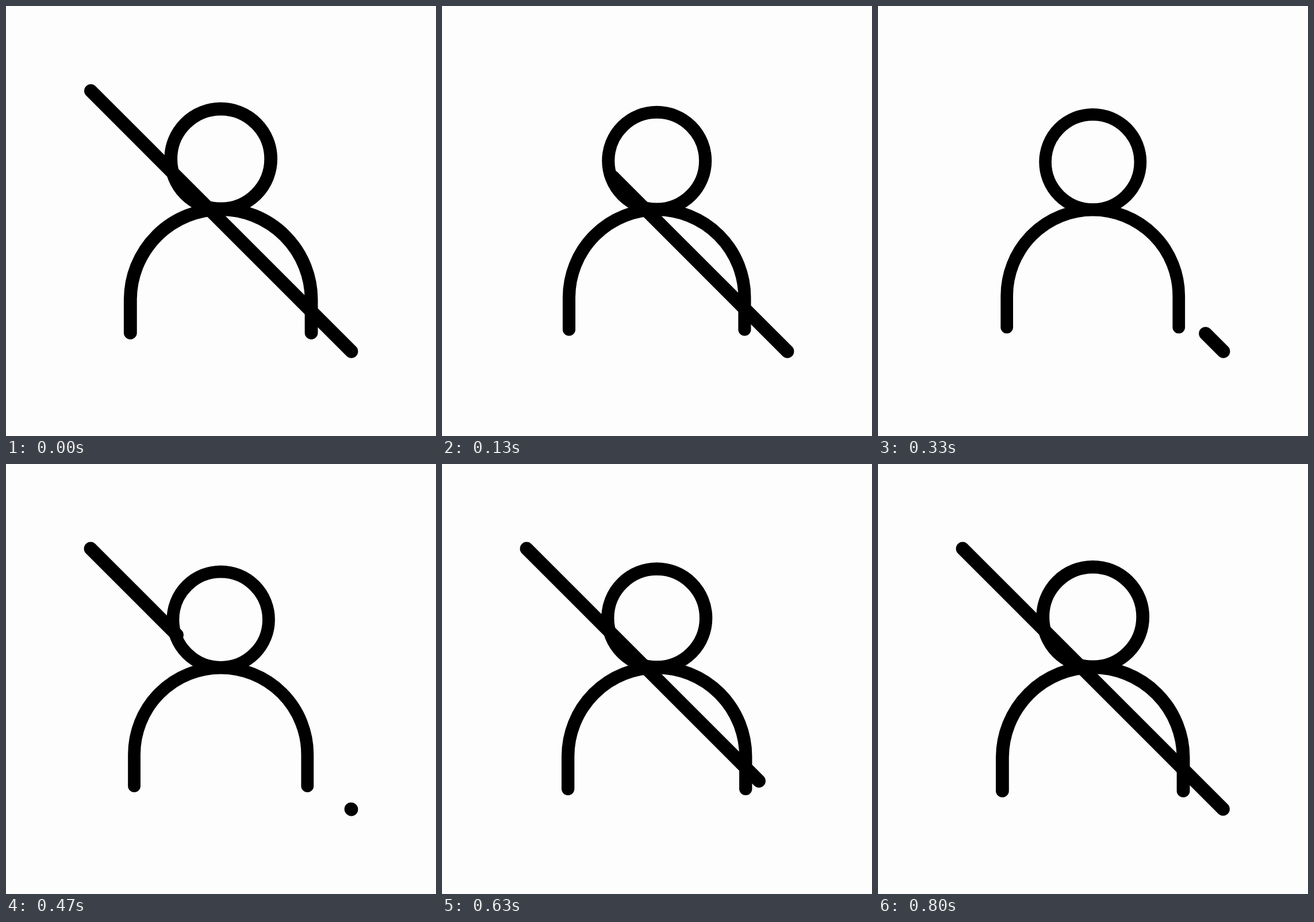
An HTML page for the animation above (0.83 s loop, 748 px wide and 748 px high).

```html
<!DOCTYPE html>
<html lang="en">
<head>
<meta charset="utf-8">
<title>User off icon</title>
<style>
  html, body { margin: 0; width: 100%; height: 100%; overflow: hidden; background: #fdfdfd; }
  svg { display: block; width: 100%; height: 100%; }
</style>
</head>
<body>
<svg viewBox="0 0 748 748" fill="none" stroke="#000" stroke-width="22.8" stroke-linecap="round">
  <g id="person">
    <circle cx="373.7" cy="266" r="87"/>
    <path d="M216.3 568.5V511a157.4 157.4 0 0 1 314.8 0v57.5"/>
  </g>
  <path id="leaving" stroke-width="23.2"/>
  <path id="entering" stroke-width="23.2"/>
</svg>
<script>
const LOOP = 830, FRAME = 1000 / 30;
const FROM = 147.2, TO = 600.8, CENTER = 373.7;
const [person, leaving, entering] =
  ['person', 'leaving', 'entering'].map(id => document.getElementById(id));

const clamp = x => Math.min(1, Math.max(0, x));
const smooth = x => x * x * (3 - 2 * x);

// cubic-bezier(.4, 0, .2, 1), solved by bisection
function ease(x) {
  let lo = 0, hi = 1;
  for (let i = 0; i < 24; i++) {
    const u = (lo + hi) / 2, v = 1 - u;
    if (1.2 * v * v * u + 0.6 * v * u * u + u * u * u < x) lo = u;
    else hi = u;
  }
  return smooth(lo);
}

// Diagonal stroke between two fractions of its length
function slash(el, a, b, visible) {
  const at = f => FROM + (TO - FROM) * f;
  el.setAttribute('d', visible ? `M${at(a)} ${at(a)}L${at(b)} ${at(b)}` : '');
}

function draw(ms) {
  const step = Math.floor((ms + 4) / FRAME);   // 30 steps per second
  const t = step + 0.3;

  const dip = t < 11 ? ease(t / 11) : 1 - smooth(clamp((t - 11) / 14));
  person.setAttribute('transform',
    `translate(${CENTER} ${CENTER}) scale(${1 - 0.05 * dip}) translate(${-CENTER} ${-CENTER})`);

  slash(leaving, ease(clamp(t / 15)), 1, t < 15);
  const grown = ease(clamp((t - 10) / 15));
  slash(entering, 0, grown, grown > 0.002);
}

const start = performance.now();
function tick() {
  draw((performance.now() - start) % LOOP);
  requestAnimationFrame(tick);
}
tick();
</script>
</body>
</html>
```
